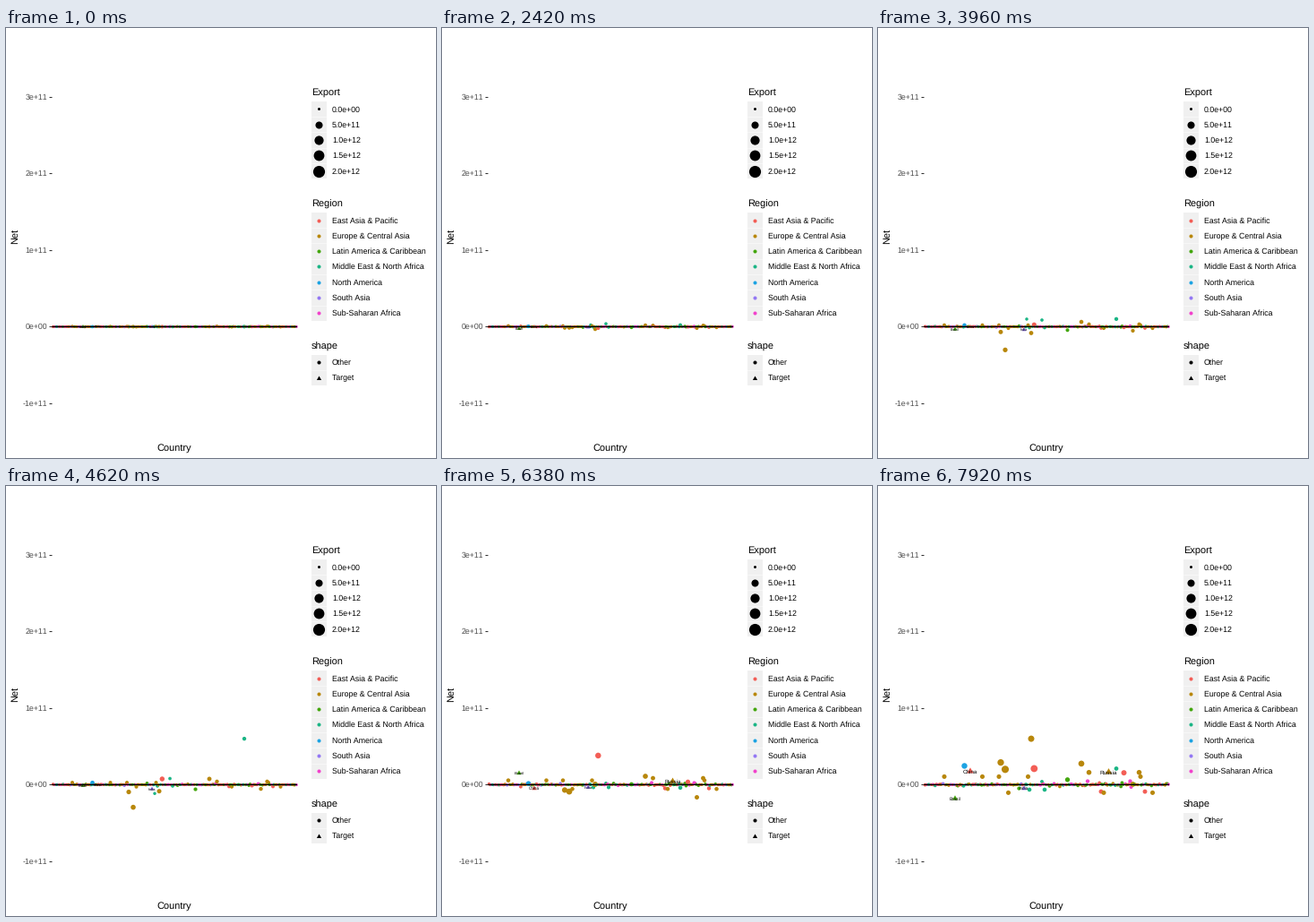
Write a matplotlib script that moves like this. It is 480x480 px and loops after 8000 ms.

```python
import matplotlib.pyplot as plt
import numpy as np
from matplotlib.animation import FuncAnimation

plt.rcParams["font.family"] = "Liberation Sans"
plt.rcParams["text.hinting"] = "none"
plt.rcParams["text.kerning_factor"] = 6      # no pair kerning

SIZE, LOOP, STEP, TICK = 480, 8000, 220, 40
FIRST, LAST = 1960, 1996
ZERO, PER_BN = 333.4, 0.855          # pixel row of zero, pixels per billion
MAX_EXPORT = 2200.0
GROWTH = 0.09

REGIONS = {
    "East Asia & Pacific": "#F35E56",
    "Europe & Central Asia": "#B8870B",
    "Latin America & Caribbean": "#43A60D",
    "Middle East & North Africa": "#1BB585",
    "North America": "#1CA3E3",
    "South Asia": "#9378F4",
    "Sub-Saharan Africa": "#F242CC",
}
COLORS = list(REGIONS.values())
EAP, ECA, LAC, MENA, NAM, SAS, SSA = range(7)


def growth(year, rate=GROWTH):
    return np.exp(rate * (year - LAST))


def path(**keys):
    """Net trade through key years given as y81=7.5, flat zero before 1969."""
    points = {FIRST: 0, 1969: 0}
    points.update((1900 + int(k[1:]), v) for k, v in keys.items())
    years, values = list(points), list(points.values())
    return lambda year: np.interp(year, years, values)


def steady(net):
    return lambda year: net * growth(year)


def swing(scale, phase, speed):
    return lambda year: scale * growth(year, 0.06) * np.sin(phase + speed * year)


class Country:
    def __init__(self, x, region, export, net, rate=GROWTH, name="", since=FIRST):
        self.x, self.region, self.export, self.net = x, region, export, net
        self.rate, self.name, self.since = rate, name, since

    def at(self, year):
        if year < self.since:
            return np.nan, 0
        net = self.net(year)
        if self.since > FIRST:
            return net, self.export + 2 * net
        return net, self.export * growth(year, self.rate)


TARGETS = [
    Country(86, LAC, 55, path(y74=-6.5, y81=-1, y84=11, y89=15, y93=6, y96=-18),
            name="Brazil"),
    Country(103, EAP, 125, path(y84=0, y85=-12, y89=-5, y91=11.5, y93=-11.5,
                                y96=17.5), rate=0.19, name="China"),
    Country(163, SAS, 40, path(y81=-5.5, y89=-3.5, y96=-5), name="India"),
    Country(257.5, ECA, 100, path(y89=4.5, y91=1, y92=65, y93=33, y96=16.5),
            name="Russia", since=1989),
]

MAJOR = [
    Country(137, ECA, 360, path(y74=-3.5, y81=-9.5, y89=-7, y93=22, y96=29)),
    Country(142, ECA, 510, path(y74=-3, y80=-44, y82=-15, y89=-9, y96=20)),
    Country(171, ECA, 310, path(y74=-8, y81=-8.5, y89=0.5, y93=32, y96=60)),
    Country(174.3, EAP, 450, path(y74=-4, y81=7.5, y86=77, y90=25, y93=95,
                                  y94=95, y96=21)),
    Country(266, MENA, 60, path(y73=4, y74=23, y78=10, y81=60, y83=-9,
                                y89=-4, y96=21), rate=0.03),
    Country(183, MENA, 16, path(y74=9.5, y81=8, y90=1, y96=4), rate=0.03),
    Country(166, MENA, 5, path(y79=11, y81=-11.5, y84=0), rate=0),
    Country(96.5, NAM, 230, path(y81=2.5, y93=1, y96=24.5)),
    Country(211.5, LAC, 105, path(y81=-6, y89=0.5, y93=-16.5, y96=6.5)),
    Country(227, ECA, 260, path(y74=4.5, y89=11, y96=27.5)),
    Country(284.5, ECA, 145, path(y74=-5, y81=-5.5, y89=-16.5, y96=0.5)),
    Country(274.5, EAP, 170, path(y81=-1, y93=6, y96=15.5)),
]

# Lasting surpluses and deficits: region, level, positions
MAJOR += [
    Country(x, region, 8 * abs(net), steady(net))
    for region, net, spots in (
        (ECA, 10.5, (74, 116.5, 135, 167.5, 293)),
        (ECA, 16, (235.5, 291.5)),
        (ECA, -10.5, (145.5, 252, 306.5)),
        (EAP, -9, (249, 298)),
        (MENA, -6.5, (169, 186)),
        (SSA, 4.5, (234, 281.5)))
    for x in spots
]


def small_countries(taken):
    rng = np.random.default_rng(11)
    share = np.array([37, 58, 42, 21, 1, 8, 50]) / 217
    for x in 52.5 + 1.264 * np.arange(216):
        region = rng.choice(7, p=share)
        scale = min(rng.lognormal(-0.9, 1.1), 5)
        net = swing(scale, rng.uniform(0, 6.28), rng.uniform(0.15, 0.4))
        if np.abs(taken - x).min() > 0.63:
            yield Country(x, region, 5 * scale, net)


taken = np.array([c.x for c in MAJOR + TARGETS])
others = sorted([*MAJOR, *small_countries(taken)], key=lambda c: c.x)


def point_size(export):
    return 1 + 5 * np.sqrt(np.asarray(export) / MAX_EXPORT)


def dot_area(size):
    return (2.134 * size + 0.85) ** 2


def triangle_area(size):
    return (3.3 * size + 1.1) ** 2


TRIANGLE = (3, 0, 0)

fig = plt.figure(figsize=(SIZE / 72, SIZE / 72), dpi=72, facecolor="white")
ax = fig.add_axes([0, 0, 1, 1])
ax.set(xlim=(0, SIZE), ylim=(SIZE, 0))
ax.axis("off")


def label(x, y, text, size=8.8, color="black", **kw):
    return ax.text(x, y, text, fontsize=size, color=color, **kw)


def legend(title, title_y, top, entries):
    """entries: (text, color, marker, area)"""
    left, key = 340.8, 17.28
    label(341, title_y, title, 11)
    ax.add_patch(plt.Rectangle((left, top), key, key * len(entries),
                               fc="#F0F0F0", ec="none"))
    for i, (text, color, marker, area) in enumerate(entries):
        y = top + (i + 0.5) * key
        if i:
            ax.plot([left, left + key], [y - key / 2] * 2,
                    color="white", lw=0.5)
        ax.scatter(left + key / 2, y, s=area, c=color, marker=marker,
                   lw=0, zorder=3)
        label(364, y + 3, text)


# Axes
for k in (3, 2, 1, 0, -1):
    y = ZERO - k * 100 * PER_BN
    label(46.2, y + 3, f"{k}e+11" if k else "0e+00",
          color="#4D4D4D", ha="right")
    ax.plot([48.4, 51.2], [y, y], color="#333333", lw=1.07,
            solid_capstyle="butt")
label(188, 472, "Country", 11, ha="center")
label(15, 232.5, "Net", 11, rotation=90, ha="right", va="center")

# Legends
legend("Export", 75, 81.8, [
    (text, "black", "o", dot_area(point_size(500 * i)))
    for i, text in enumerate(
        ("0.0e+00", "5.0e+11", "1.0e+12", "1.5e+12", "2.0e+12"))])
legend("Region", 199.5, 205.9, [
    (name, color, "o", dot_area(1.5)) for name, color in REGIONS.items()])
legend("shape", 358.3, 364.7, [
    ("Other", "black", "o", dot_area(1.5)),
    ("Target", "black", TRIANGLE, triangle_area(1.5))])


# Moving parts
def points(countries, **kw):
    return ax.scatter([c.x for c in countries], [ZERO] * len(countries), lw=0,
                      c=[COLORS[c.region] for c in countries], **kw)


dots = points(others, zorder=4)
marks = points(TARGETS, marker=TRIANGLE, zorder=5)
ax.plot([51.2, 325], [ZERO, ZERO], color="black", lw=1.3, snap=False,
        solid_capstyle="butt", zorder=6)
names = [label(c.x, ZERO, c.name, ha="center", zorder=7) for c in TARGETS]


def place(group, countries, area, year):
    net, export = np.array([c.at(year) for c in countries]).T
    y = ZERO - PER_BN * net
    size = point_size(export)
    group.set_offsets(np.column_stack([[c.x for c in countries], y]))
    group.set_sizes(area(size))
    return y, size


def update(i):
    year = min(FIRST + (i * TICK + TICK // 2) // STEP, LAST)
    place(dots, others, dot_area, year)
    ys, sizes = place(marks, TARGETS, triangle_area, year)
    for text, c, y, size in zip(names, TARGETS, ys, sizes):
        shown = year >= c.since
        text.set_visible(shown)
        if shown:
            font = 2.845 * size
            text.set_position((c.x, y + 0.36 * font))
            text.set_fontsize(font)
    return [dots, marks, *names]


anim = FuncAnimation(fig, update, frames=LOOP // TICK, interval=TICK,
                     repeat=True, repeat_delay=0, blit=False)
plt.show()
```
